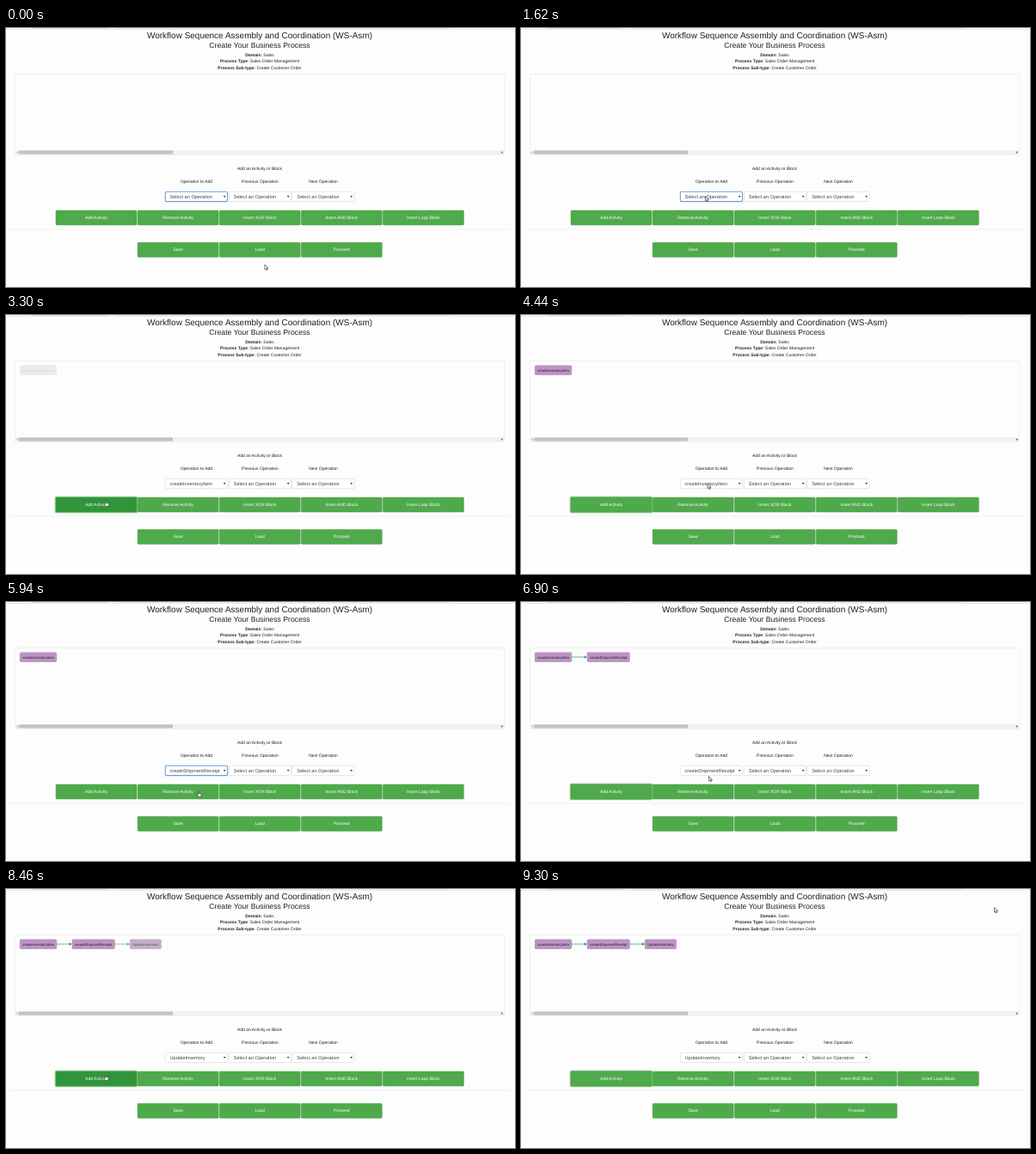
Recreate the animation shown at these times as an HTML page. Size 592 by 301 pixels, loop 9.36 s.

```html
<!DOCTYPE html>
<html lang="en">
<head>
<meta charset="utf-8">
<title>Process editor</title>
<style>
  html, body { margin: 0; width: 100%; height: 100%; overflow: hidden; background: #fdfdfd; }
  svg { display: block; width: 100%; height: 100%; }
  text { font: 5px "Liberation Sans", Arial, sans-serif; fill: #222; text-rendering: geometricPrecision; white-space: pre; }
  .mid { text-anchor: middle; }
  .title { font-size: 10px; }
  .subtitle { font-size: 8.7px; }
  .caption { fill: #fff; }
  .value { font-size: 5.6px; fill: #444; }
  .node text { font-size: 4.2px; }
  .node rect { fill: #be93c5; stroke: #a380aa; stroke-width: .5; }
  .edge { stroke: #35a56b; stroke-width: .9; stroke-dasharray: 2.6 .5; }
</style>
</head>
<body>
<svg id="stage" viewBox="0 0 592 301"></svg>
<script>
const LOOP = 9360, STEP = 60;
const stage = document.getElementById('stage');

const label = (x, y, text, cls = '') => `<text class="mid ${cls}" x="${x}" y="${y}">${text}</text>`;
const box = (x, y, w, h, attrs) => `<rect x="${x}" y="${y}" width="${w}" height="${h}" ${attrs}/>`;

const buttons = [
  ...['Add Activity', 'Remove Activity', 'Insert XOR Block', 'Insert AND Block', 'Insert Loop Block']
    .map((text, i) => ({ text, x: 58 + 95.1 * i, y: 212 })),
  ...['Save', 'Load', 'Proceed'].map((text, i) => ({ text, x: 153.1 + 95.1 * i, y: 249.3 })),
];
const nodes = [
  { text: 'createInventoryItem', x: 16.2, w: 42.6, start: 3240 },
  { text: 'createShipmentReceipt', x: 77, w: 49.3, start: 6240 },
  { text: 'UpdateInventory', x: 144.2, w: 36.3, start: 8100 },
];
const selects = [
  { title: 'Operation to Add', x: 185.3, w: 72.2 },
  { title: 'Previous Operation', x: 259.5, w: 72 },
  { title: 'Next Operation', x: 333, w: 72 },
];

// [time, x, y] of the pointer tip
const path = [
  [0, 301, 275], [460, 301, 275], [760, 300, 271], [960, 300, 270], [1560, 214.5, 195.5],
  [2340, 215, 195.5], [2820, 116.5, 216], [3720, 116.5, 216], [4380, 217, 196],
  [5280, 222, 198], [5880, 222, 198], [5940, 224, 220], [6180, 118, 216], [6420, 118, 216],
  [6900, 218.5, 202.5], [7080, 217, 196], [7500, 217, 197], [7740, 174, 219], [7860, 156.5, 221],
  [7980, 116, 216], [8640, 116, 216], [8820, 112, 213], [9300, 550.5, 21.5], [LOOP, 550.5, 21.5],
];
const values = [[0, 'Select an Operation'], [2280, 'createInventoryItem'], [5100, 'createShipmentReceipt'], [7440, 'UpdateInventory']];
const focus = [[0, 'select'], [3120, 'button'], [4500, 'select'], [6240, 'button'], [7080, 'select'], [8100, 'button']];

const valueAt = (track, t) => track.findLast(key => key[0] <= t)[1];

function pointerAt(t) {
  const next = Math.max(1, path.findIndex(key => key[0] > t));
  const [t0, x0, y0] = path[next - 1], [t1, x1, y1] = path[next];
  const k = Math.max(0, (t - t0) / (t1 - t0)), ease = k * k * (3 - 2 * k);
  return [x0 + (x1 - x0) * ease, y0 + (y1 - y0) * ease];
}

const inside = (b, [x, y]) => x >= b.x && x < b.x + 94 && y >= b.y && y < b.y + 17;

function build() {
  const heading = (y, name, value) =>
    label(295, y, `<tspan font-weight="bold">${name}</tspan>: ${value}`);
  const button = b =>
    box(b.x, b.y, 94, 17, 'class="button" rx="1" stroke="#459c43" stroke-width=".5"') +
    label(b.x + 47, b.y + 9.7, b.text, 'caption');
  const select = s =>
    label(s.x + s.w / 2, 180.2, s.title) +
    box(s.x, 190.2, s.w, 11.4, 'class="select" rx="1" fill="#fff" stroke="#dcdcdc" stroke-width=".7"') +
    `<text class="value" x="${s.x + 5.2}" y="197.9">Select an Operation</text>` +
    `<path d="M${s.x + s.w - 4.7} 195h2.8l-1.4 2z" fill="#333"/>`;
  const node = (n, i) => {
    const edge = i ? `<path class="edge" d="M${nodes[i - 1].x + nodes[i - 1].w} 64H${n.x - 2}"/>
      <path d="M${n.x - 3.4} 62.3l3.4 1.7l-3.4 1.7z" fill="#2f9a5f"/>` : '';
    return `<g class="node">${edge}${box(n.x, 58.7, n.w, 10.8, 'rx="1.2"')}${label(n.x + n.w / 2, 65.7, n.text)}</g>`;
  };

  stage.innerHTML =
    box(0, 1, 592, .7, 'fill="#dedede"') + box(30, 0, 88, .7, 'fill="#d8d8d8"') + box(128, 0, 387, .6, 'fill="#e4e4e4"') +
    label(295, 12.2, 'Workflow Sequence Assembly and Coordination (WS-Asm)', 'title') +
    label(295, 22.7, 'Create Your Business Process', 'subtitle') +
    heading(32.7, 'Domain', 'Sales') +
    heading(40.3, 'Process Type', 'Sales Order Management') +
    heading(47.8, 'Process Sub-type', 'Create Customer Order') +
    box(10.3, 53.3, 569.5, 94, 'fill="none" stroke="#ececec" stroke-width=".7"') +
    box(10.5, 142, 569, 5, 'fill="#f1f1f1"') + box(15, 142.4, 179, 4.2, 'fill="#c3c3c3"') +
    '<path d="M13.5 143.4v2.4l-1.5-1.2z" fill="#999"/><path d="M576.3 143.2v2.8l1.7-1.4z" fill="#444"/>' +
    label(295, 165, 'Add an Activity or Block') +
    selects.map(select).join('') +
    box(4, 233.6, 582, .7, 'fill="#e8e8e8"') +
    box(57.3, 211.3, 95.4, 18.4, 'id="ring" rx="1.5" fill="none" stroke="#8fc58f" stroke-width="1.2"') +
    buttons.map(button).join('') +
    nodes.map(node).join('') +
    `<path id="arrow" d="M0 0v5.6l1.3-1.2l1 2.1l.9-.4l-1-2h1.8z" fill="#fff" stroke="#222" stroke-width=".6"/>
     <path id="hand" d="M-.6 .5q.6-1 1.2 0v2l2.2.6q.6.3.4 1.2l-.5 2h-3.2l-1.6-2.2q.2-.9 1.5 0z"
       fill="#fff" stroke="#222" stroke-width=".6"/>`;
}

build();
const find = query => stage.querySelector(query);
const buttonEls = stage.querySelectorAll('.button');
const nodeEls = stage.querySelectorAll('.node');
const firstSelect = find('.select'), firstValue = find('.value');
const ring = find('#ring'), arrow = find('#arrow'), hand = find('#hand');

function draw(t) {
  const tip = pointerAt(t), focused = valueAt(focus, t);
  let overButton = false;

  buttons.forEach((b, i) => {
    overButton ||= inside(b, tip);
    // hover colour lags behind the pointer
    const level = [1, 2].filter(n => inside(b, pointerAt(Math.max(0, t - n * STEP)))).length / 2;
    const mix = (from, to) => Math.round(from + (to - from) * level);
    buttonEls[i].setAttribute('fill', `rgb(${mix(79, 48)},${mix(170, 148)},${mix(75, 58)})`);
  });

  nodes.forEach((n, i) => {
    const k = Math.min(1, Math.max(0, (t - n.start) / 480));
    nodeEls[i].style.opacity = t < n.start ? 0 : .06 + .94 * k;
    nodeEls[i].style.filter = k < 1 ? `grayscale(${1 - k})` : 'none';
  });

  firstValue.textContent = valueAt(values, t);
  firstSelect.setAttribute('stroke', focused === 'select' ? '#6d9edb' : '#dcdcdc');
  firstSelect.setAttribute('stroke-width', focused === 'select' ? 1.1 : .7);
  ring.style.display = focused === 'button' ? '' : 'none';

  for (const el of [arrow, hand]) {
    el.setAttribute('transform', `translate(${tip})`);
    el.style.display = (el === hand) === overButton ? '' : 'none';
  }
}

function tick() {
  draw(Math.floor(performance.now() % LOOP / STEP) * STEP);
  requestAnimationFrame(tick);
}
tick();
</script>
</body>
</html>
```
